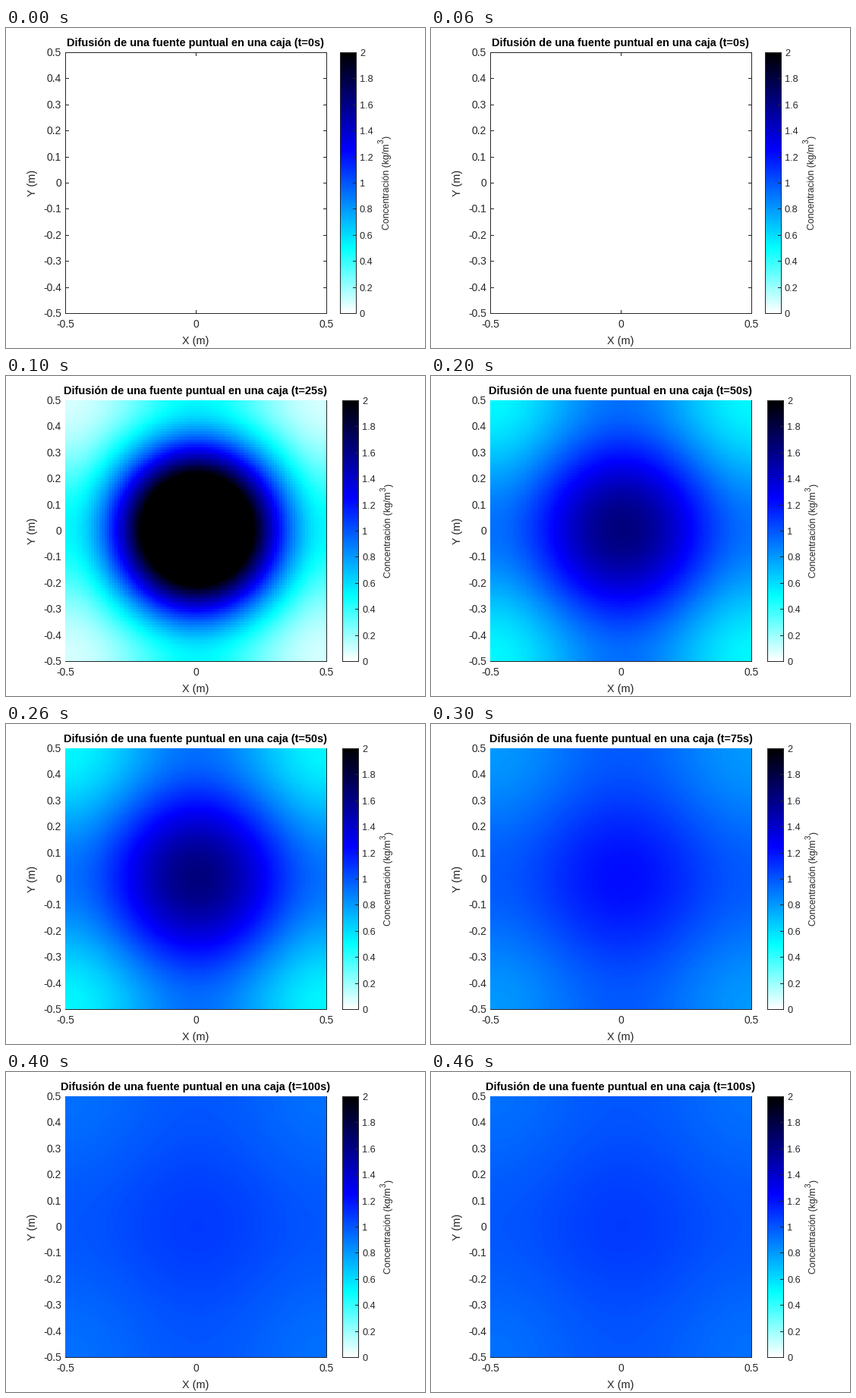
Animation, 552 px wide and 422 px high, one loop 500 ms. Source, as a matplotlib script:

```python
import numpy as np
import matplotlib.pyplot as plt
from matplotlib.animation import FuncAnimation
from matplotlib.colors import LinearSegmentedColormap
from matplotlib.transforms import Affine2D

W, H, DPI = 552, 422, 64
LEFT, RIGHT, TOP, BOTTOM = 78, 422, 32, 376
BAR_LEFT, BAR_RIGHT = 440, 461
TICK = 4
GREY = "#262626"
DIFFUSIVITY = 1e-3
TIME_STEP = 25

plt.rcParams["font.family"] = "Liberation Sans"
fig = plt.figure(figsize=(W / DPI, H / DPI), dpi=DPI, facecolor="white")
ax = fig.add_axes([0, 0, 1, 1])
ax.set_xlim(0, W)
ax.set_ylim(H, 0)
ax.axis("off")

cmap = LinearSegmentedColormap.from_list(
    "cold", [(0, "white"), (0.25, "cyan"), (0.625, "blue"), (1, "black")], N=256)

# The colour bar is slid sideways through this transform.
slide = Affine2D()
bar_space = slide + ax.transData


def pt(pixels):
    return pixels * 72 / DPI


def line(xs, ys, space=ax.transData):
    # Whole coordinates snap to the centre of the pixel of that index.
    ax.plot(xs, ys, color=GREY, lw=pt(1), antialiased=False, snap=True,
            solid_capstyle="butt", transform=space, zorder=2)


def box(x0, x1, y0, y1, space=ax.transData):
    line([x0, x1, x1, x0, x0], [y0, y0, y1, y1, y0], space)


def label(x, y, text, size, ha="center", space=ax.transData, **kw):
    kw.setdefault("color", GREY)
    return ax.text(x, y, text, fontsize=pt(size), ha=ha, va="baseline",
                   transform=space, **kw)


def upright(x, y, text, size, space=ax.transData):
    label(x, y, text, size, ha="left", space=space, rotation=90,
          rotation_mode="anchor")


def picture(data, x0, x1, **kw):
    return ax.imshow(data, cmap=cmap, origin="lower", aspect="auto",
                     extent=(x0, x1, BOTTOM, TOP), interpolation="nearest", **kw)


def profile(x, t):
    """Point source between two reflecting walls, in one dimension."""
    total = np.ones_like(x)
    for n in range(1, 6):
        k = 2 * np.pi * n
        total += 2 * np.exp(-k * k * DIFFUSIVITY * t) * np.cos(k * x)
    return total


def concentration(t):
    g = profile(np.linspace(-0.5, 0.5, 101)[:-1], t)
    return np.outer(g, g)


def draw_axes():
    box(LEFT, RIGHT, TOP, BOTTOM)
    for v in (-0.5, 0, 0.5):
        x = 250 + 344 * v
        line([x, x], [BOTTOM, BOTTOM - TICK])
        line([x, x], [TOP, TOP + TICK])
        label(x, 395, f"{v:g}", 13.9)
    for i in range(-5, 6):
        row = round(204 - 34.4 * i)
        line([LEFT, LEFT + TICK], [row, row])
        line([RIGHT, RIGHT - TICK], [row, row])
        label(73, row + 5, f"{i / 10:g}", 13.9, ha="right")
    label(250, 417, "X (m)", 14.4)
    upright(39.5, 221.5, "Y (m)", 14.4)


def draw_bar():
    picture(np.linspace(0, 1, 256)[:, None], BAR_LEFT, BAR_RIGHT,
            transform=bar_space, zorder=1)
    box(BAR_LEFT, BAR_RIGHT, TOP, BOTTOM, bar_space)
    for i in range(11):
        row = round(BOTTOM - 34.4 * i)
        line([BAR_RIGHT, BAR_RIGHT - TICK], [row, row], bar_space)
        label(466, row + 5, f"{i / 5:g}", 12.7, ha="left", space=bar_space)
    upright(504.5, 265.5, "Concentración (kg/m", 12.3, bar_space)
    upright(498, 151.7, "3", 10, bar_space)
    upright(504.5, 146.2, ")", 12.3, bar_space)


draw_axes()
draw_bar()
title = label(250, 24, "", 14.5, color="black", weight="bold")
field = picture(concentration(TIME_STEP), LEFT, RIGHT, vmin=0, vmax=2, zorder=3)


def update(i):
    t = i * TIME_STEP
    started = t > 0
    title.set_text(f"Difusión de una fuente puntual en una caja (t={t}s)")
    field.set_visible(started)
    if started:
        field.set_data(concentration(t))
    slide.clear().translate(3 if started else 0, 0)
    return title, field


anim = FuncAnimation(fig, update, frames=5, interval=100, repeat=True,
                     repeat_delay=0, blit=False)
plt.show()
```
